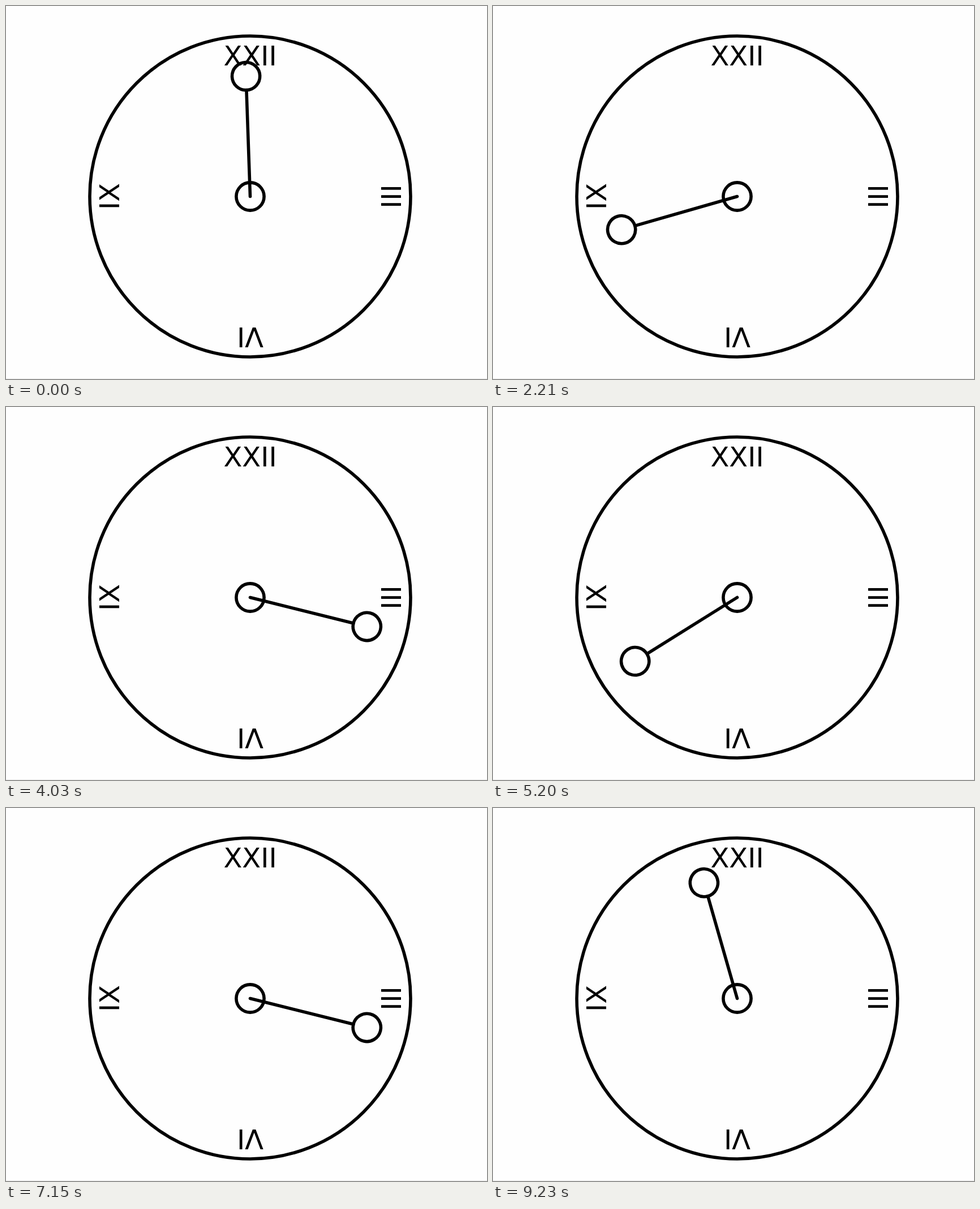
Animation of 850 by 659 pixels, one loop 9360 ms. Source, as an HTML page:

```html
<!DOCTYPE html>
<html lang="en">
<head>
<meta charset="utf-8">
<title>Clock</title>
<style>
  html, body { margin: 0; width: 100%; height: 100%; overflow: hidden; background: #fefefe; }
  svg { display: block; width: 850px; height: 659px; }
  .ink { fill: none; stroke: #000; stroke-width: 5.6; stroke-linecap: round; }
  text { font: 48px "DejaVu Sans", sans-serif; text-anchor: middle; fill: #000; }
</style>
</head>
<body>
<svg viewBox="0 0 850 659">
  <rect y="658" width="850" height="1" fill="#ececec"/>
  <g transform="translate(431.5 336.5)">
    <circle class="ink" r="283.5"/>
    <text y="-231.5">XXII</text>
    <text y="-231.5" transform="rotate(90)">III</text>
    <text y="-231.5" transform="rotate(180)">VI</text>
    <text y="-231.5" transform="rotate(270)">IX</text>
    <circle class="ink" r="24.6"/>
    <g id="hand" class="ink">
      <path d="M0 0V-188"/>
      <circle cy="-212.6" r="24.6"/>
    </g>
  </g>
</svg>
<script>
  const STEP = 130, STEPS = 72;
  const hand = document.getElementById('hand');

  // 15 degrees per tick, with one degree of lag on every eighth tick.
  const angleAt = tick => tick * 15 - (tick % 8 ? 1 : 2);

  function draw(now) {
    const tick = Math.floor(now / STEP) % STEPS;
    hand.setAttribute('transform', `rotate(${angleAt(tick)})`);
  }

  const start = performance.now();
  function loop() {
    draw(performance.now() - start);
    requestAnimationFrame(loop);
  }
  loop();
</script>
</body>
</html>
```
